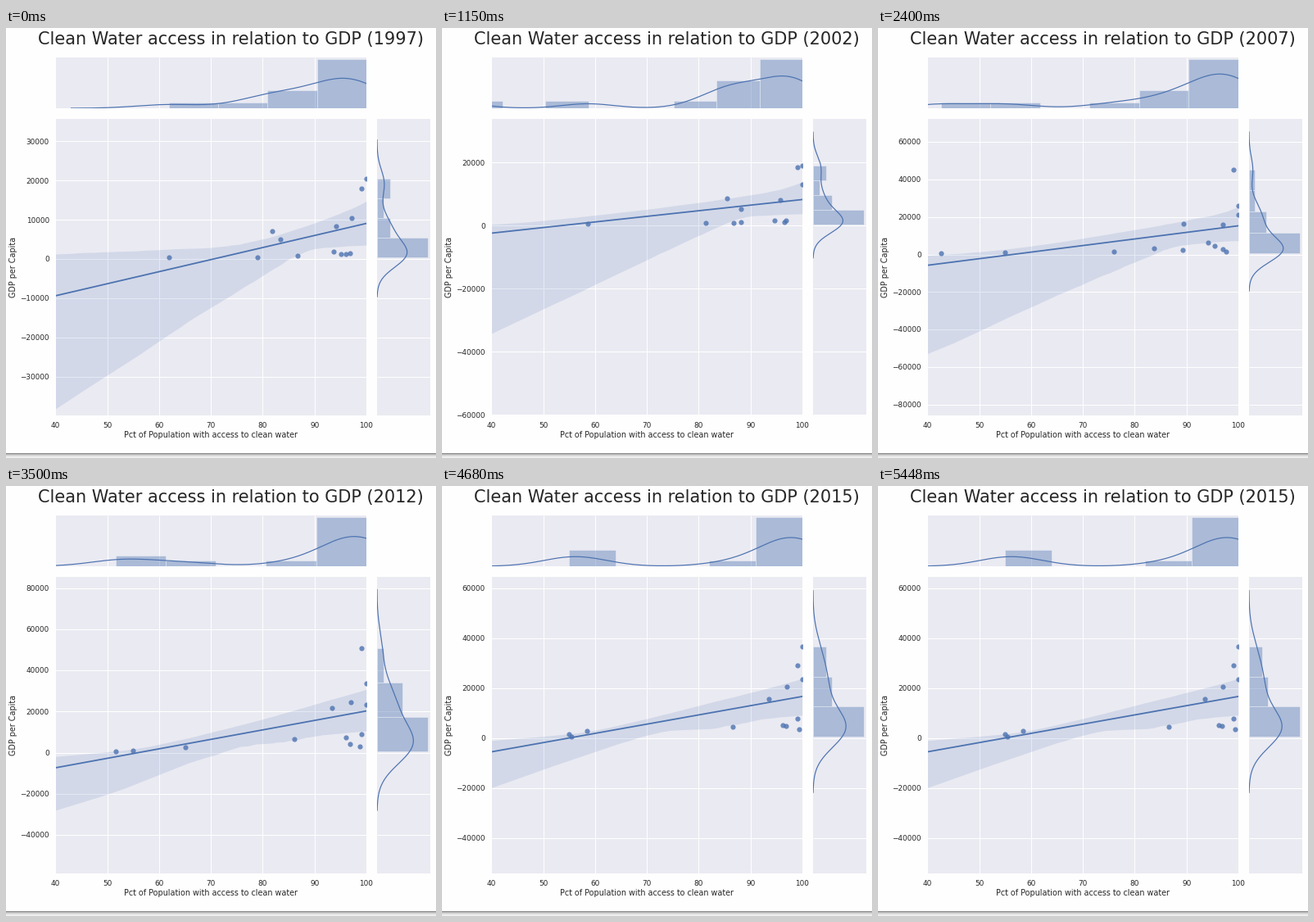
Recreate the animation shown at these times as a matplotlib script. Size 525 px wide and 525 px high, loop 5960 ms.

```python
import numpy as np
import matplotlib.pyplot as plt
from matplotlib.animation import FuncAnimation

SIZE, DPI = 525, 100
PT = 72 / DPI  # points per pixel
LOOP, STEP = 5960, 20
STARTS = [0, 1150, 2400, 3500, 4680]
BLUE, PANEL, INK = "#4c72b0", "#eaeaf2", "#262626"

# Joint layout: a 6 x 6 grid of cells with gaps of 0.2 cell, marginals one cell wide
LEFT, BOTTOM, CELL_W, CELL_H = 60.5, 473, 65.41, 62.5
RIGHT, TOP = LEFT + 5.8 * CELL_W, BOTTOM - 5.8 * CELL_H
PCT = np.arange(40, 101, 10)

plt.rcParams["font.family"] = "DejaVu Sans"
fig = plt.figure(figsize=(SIZE / DPI, SIZE / DPI), dpi=DPI, facecolor="#fefefe")


def panel(x0, y0, x1, y1):
    """Axes whose data units are stage pixels, y pointing down."""
    ax = fig.add_axes([x0 / SIZE, 1 - y1 / SIZE, (x1 - x0) / SIZE, (y1 - y0) / SIZE],
                      facecolor=PANEL)
    ax.set(xlim=(x0, x1), ylim=(y1, y0), xticks=[], yticks=[], autoscale_on=False)
    ax.spines[:].set_visible(False)
    return ax


joint = panel(LEFT, TOP, RIGHT, BOTTOM)
marg_x = panel(LEFT, TOP - 1.2 * CELL_H, RIGHT, TOP - 0.2 * CELL_H)
marg_y = panel(RIGHT + 0.2 * CELL_W, TOP, RIGHT + 1.2 * CELL_W, BOTTOM)


def pct_px(pct):
    return LEFT + (np.asarray(pct) - 40) / 60 * (RIGHT - LEFT)


def label(x, y, text, px, ha="center", va="baseline", **kw):
    return joint.text(x, y, text, fontsize=px * PT, color=INK, ha=ha, va=va, **kw)


def grid(ax, xs=(), ys=()):
    style = dict(colors="white", linewidths=PT, zorder=0.5)
    return [ax.vlines(xs, *ax.get_ylim(), **style),
            ax.hlines(ys, *ax.get_xlim(), **style)]


def density(v):
    """Gaussian KDE with Scott's robust bandwidth, cut at three bandwidths."""
    q25, q75 = np.percentile(v, [25, 75])
    bw = 1.059 * min(v.std(ddof=1), (q75 - q25) / 1.349) * len(v) ** -0.2
    t = np.linspace(v.min() - 3 * bw, v.max() + 3 * bw, 160)
    z = (t[:, None] - v) / bw
    return t, np.exp(-z * z / 2).sum(1) / (len(v) * bw * np.sqrt(2 * np.pi))


def marginal(ax, v, upright):
    """Histogram with Freedman-Diaconis bins under a density curve."""
    dens, edges = np.histogram(v, "fd", density=True)
    base, end = ax.get_ylim() if upright else ax.get_xlim()
    scale = (end - base) / (1.05 * dens.max())
    style = dict(align="edge", facecolor=BLUE, edgecolor="white", alpha=0.4,
                 linewidth=0.8 * PT)
    used = dens > 0
    pos, size, width = edges[:-1][used], dens[used] * scale, np.diff(edges)[used]
    if upright:
        bars = ax.bar(pos, size, width, bottom=base, **style)
    else:
        bars = ax.barh(pos, size, width, left=base, **style)
    t, d = density(v)
    d = base + d * scale
    return [*bars, *ax.plot(*((t, d) if upright else (d, t)), color=BLUE, lw=1.2 * PT)]


def regression(xs, ys, grid_x, rng):
    """Least-squares line and its 95 % bootstrap band on grid_x."""
    def line(x, y):
        mx, my = x.mean(-1, keepdims=True), y.mean(-1, keepdims=True)
        slope = ((x - mx) * (y - my)).sum(-1) / ((x - mx) ** 2).sum(-1)
        return my + slope[..., None] * (grid_x - mx)

    pick = rng.integers(len(xs), size=(2000, len(xs)))
    return line(xs, ys), np.percentile(line(xs[pick], ys[pick]), [2.5, 97.5], axis=0)


def scene(year, zero, unit, points):
    """One year's artists; GDP in thousands, unit pixels each, 0 at height zero."""
    pct, gdp = np.array(points).T
    xs, ys = pct_px(pct), zero - unit * gdp
    step = 10 if unit > 4 else 20
    ticks = [k for k in range(-100, 101, step) if TOP < zero - unit * k < BOTTOM]
    tick_y = [zero - unit * k for k in ticks]

    arts = [label(274.3, 20, f"Clean Water access in relation to GDP ({year})", 20.9)]
    for k, y in zip(ticks, tick_y):
        text = str(k * 1000).replace("-", "\u2212")
        arts.append(label(LEFT - 7.6, y + 3.2, text, 8.84, ha="right"))
    arts += grid(joint, ys=tick_y) + grid(marg_y, ys=tick_y)

    grid_x = np.linspace(LEFT, RIGHT, 100)
    fit, band = regression(xs, ys, grid_x, np.random.default_rng(year))
    arts.append(joint.fill_between(grid_x, *band, color=BLUE, alpha=0.15, lw=0))
    arts += joint.plot(grid_x, fit, color=BLUE, lw=1.8 * PT)
    arts.append(joint.scatter(xs, ys, s=(6.2 * PT) ** 2, color=BLUE, alpha=0.8,
                              lw=0, zorder=3))
    return arts + marginal(marg_x, xs, True) + marginal(marg_y, ys, False)


# Fixed parts
grid(joint, xs=pct_px(PCT))
grid(marg_x, xs=pct_px(PCT))
for pct in PCT:
    label(pct_px(pct), 487.8, str(pct), 8.84)
label(250.3, 500.3, "Pct of Population with access to clean water", 9.65)
label(9, 292, "GDP per Capita", 9.65, rotation=90, va="center")
for row in range(6):  # soft shadow line along the bottom
    grey = 1 - 0.44 * 0.66 ** row
    fig.add_artist(plt.Rectangle((0, 1 - (520 + row) / SIZE), 1, 1 / SIZE, lw=0,
                                 color=str(grey), transform=fig.transFigure))

# (percent with clean water, GDP per capita in thousands)
scenes = [
    scene(1997, 282.3, 4.8, [
        (61.9, 0.4), (79, 0.4), (81.8, 7.1), (83.4, 5), (86.7, 0.8), (93.7, 1.9),
        (94.2, 8.3), (95.1, 1.25), (96, 1.25), (96.8, 1.6), (97.2, 10.5), (99.1, 18),
        (100, 20.4)]),
    scene(2002, 241.5, 3.85, [
        (33.9, 0.3), (58.6, 0.65), (81.3, 0.8), (85.5, 8.7), (86.7, 1), (88.1, 1.2),
        (88.1, 5.3), (94.6, 1.8), (95.7, 8.3), (96.5, 1.2), (96.9, 1.7), (99.1, 18.6),
        (100, 19.2), (100, 13.2)]),
    scene(2007, 276.7, 2.29, [
        (42.6, 0.65), (54.9, 1.3), (76, 1.7), (83.7, 3.5), (89.2, 2.4), (89.4, 16.4),
        (94.2, 6.3), (95.5, 4.8), (97, 15.9), (97, 3.1), (97.6, 1.7), (99.1, 45.4),
        (100, 26.2), (100, 21.4)]),
    scene(2012, 325.6, 2.513, [
        (51.6, 0.6), (54.9, 1.2), (65.1, 2.6), (86.1, 6.6), (93.4, 21.7), (96, 7.6),
        (96.9, 4.4), (97, 24.7), (98.8, 3), (99.1, 50.7), (99.1, 8.8), (100, 33.8),
        (100, 23.3)]),
    scene(2015, 307.7, 3.05, [
        (54.9, 1.4), (55.4, 0.7), (58.4, 2.7), (86.6, 4.5), (93.5, 15.5), (96.3, 5.3),
        (96.9, 4.8), (97, 20.6), (99.1, 29.1), (99.1, 7.9), (99.4, 3.5), (100, 36.5),
        (100, 23.5)]),
]


def update(i):
    now = np.searchsorted(STARTS, (i + 0.5) * STEP, side="right") - 1
    for k, arts in enumerate(scenes):
        for art in arts:
            art.set_visible(k == now)
    return scenes[now]


anim = FuncAnimation(fig, update, frames=LOOP // STEP, interval=STEP,
                     init_func=lambda: update(0), repeat=True, repeat_delay=0)
plt.show()
```
